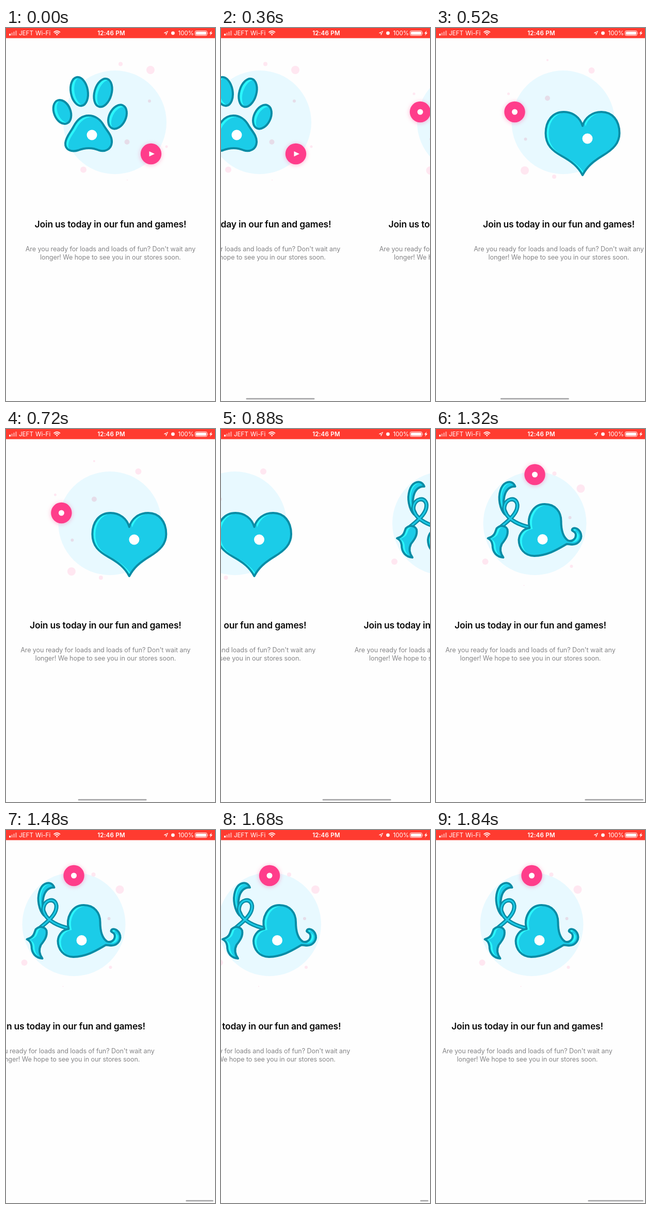
Write an HTML page that moves like this. It is 405 px wide and 720 px high and loops after 1.88 s.

```html
<!DOCTYPE html>
<html lang="en">
<head>
<meta charset="utf-8">
<title>Onboarding pages</title>
<style>
  html, body { margin: 0; width: 100%; height: 100%; overflow: hidden; background: #fefefe; }
  svg { display: block; width: 405px; height: 720px; }
  text { font-family: Inter, Roboto, "Liberation Sans", sans-serif; }
  .title { font-size: 17.5px; font-weight: 600; letter-spacing: -.2px; fill: #0a0a0a; text-anchor: middle; }
  .body { font-size: 12.6px; letter-spacing: -.09px; fill: #858587; text-anchor: middle; }
  .status { font-size: 11.6px; fill: #fff; }
  .clock { font-weight: 600; letter-spacing: .2px; text-anchor: middle; }
  .button { filter: drop-shadow(0 1px 4px rgba(255, 61, 139, .4)); }
  .edge { fill: none; stroke: #0a8ca5; stroke-width: 4; stroke-linejoin: round; }
</style>
</head>
<body>
<svg viewBox="0 0 405 720">
  <rect width="405" height="720" fill="#fefefe"/>
  <g id="pages"></g>
  <rect id="bar" y="714.5" height="2.6" rx="1.3" fill="#a2a2a4"/>
  <g id="status">
    <rect width="405" height="19.6" fill="#ff3b30"/>
    <g fill="#fff">
      <rect x="6" y="11" width="3" height="3.5" rx=".6"/>
      <g opacity=".4">
        <rect x="10" y="9" width="3" height="5.5" rx=".6"/>
        <rect x="14" y="7" width="3" height="7.5" rx=".6"/>
        <rect x="18" y="5" width="3" height="9.5" rx=".6"/>
      </g>
      <path d="M96.8 12.3Q98.7 10.7 100.6 12.3L98.7 14.5Z"/>
      <circle cx="323.5" cy="9.8" r="3.4"/>
      <rect x="368" y="7" width="20" height="6" rx="1"/>
      <path d="M390.8 8.2q1.6 1.7 0 3.6zM398.8 5l-5 5.6h2.8l-1.4 4.2 5-5.8h-2.8z"/>
    </g>
    <g fill="none" stroke="#fff">
      <path stroke-width="1.6" d="M92.4 8.3Q98.7 2.8 105 8.3M94.6 10.6Q98.7 7 102.8 10.6"/>
      <path d="M306.5 9.6L313.6 6.2L310.2 13.4V9.6Z" stroke-linejoin="round"/>
      <rect x="366.5" y="5.5" width="23" height="9" rx="2.2"/>
    </g>
    <text class="status" x="25" y="14">JEFT</text>
    <text class="status" x="57" y="14">Wi-Fi</text>
    <text class="status clock" x="204" y="14">12:46 PM</text>
    <text class="status" x="333.5" y="14">100%</text>
  </g>
</svg>
<script>
const LOOP = 1880, STEP = 40, PAGE = 405, LAST = 2 * PAGE;

let clips = 0;

// Filled outline with a light rim on the side opposite to the shift.
function blob(path, dx = 6, dy = 2) {
  const id = "clip" + clips++;
  return `<clipPath id="${id}"><path d="${path}"/></clipPath>
    <g clip-path="url(#${id})"><path d="${path}" fill="#2bf6fb"/>
    <path d="${path}" fill="#1bcce8" transform="translate(${dx} ${dy})"/></g>
    <path class="edge" d="${path}"/>`;
}

function toe(x, y, rx, ry, turn) {
  const oval = `M0 ${-ry}A${rx} ${ry} 0 0 1 0 ${ry}A${rx} ${ry} 0 0 1 0 ${-ry}Z`;
  return `<g transform="translate(${x} ${y}) rotate(${turn})">${blob(oval, 7, 1)}</g>`;
}

function disc(x, y, r, fill) {
  return `<circle cx="${x}" cy="${y}" r="${r}" fill="${fill}"/>`;
}

function dots(list) {
  return list.map(([x, y, r]) => {
    const inside = Math.hypot(x - 211, y - 182) < 100;
    return disc(x, y, r, inside ? "#e6dde9" : "#ffe7f1");
  }).join("");
}

function button(x, y, icon) {
  return `<g transform="translate(${x} ${y})"><circle class="button" r="20.2" fill="#ff3d8b"/>${icon}</g>`;
}

const badge = disc(0, 0, 5.5, "#fff");
const play = `<path d="M-3.5 -5L7 0L-3.5 5Z" fill="#fff"/>`;
const emblem = (x, y) => disc(x, y, 10, "#fff");

const paw = toe(109, 162, 16, 24, -22) + toe(142, 122.5, 16.5, 28, -10) +
  toe(188, 125, 16.5, 28, 16) + toe(216, 171.5, 16, 24.5, 26) +
  blob("M160 169C172 169 183 176 190 189C196 199 206 208 205 221C204 234 192 240 180 236C166 230 153 231 140 236C128 240 114 236 115 222C116 210 126 200 131 190C138 177 148 169 160 169Z", 6, 3) +
  emblem(166.5, 206.5);

const heart = blob("M248.5 189C244 173 230 162 212 162C190 162 177 180 177 203C177 226 190 237 208 247C228 258 240 268 248.5 284C257 268 268 258 288 246C308 234 320 222 320 203C320 178 306 162 285 162C267 162 253 173 248.5 189Z", 6, 1) +
  emblem(258, 213.5);

const vine = "M157 192C168 182 186 170 191 155C195 142 188 134 179 136C168 139 164 152 169 161C175 175 196 186 218 190";
const sprout = `<g transform="translate(-15 0)">
  ${blob("M188 111C184 101 176 101 170 104C160 109 155 126 158 143C160 153 163 160 168 165L172 162C166 152 164 142 167 130C170 117 178 110 188 111Z", 4, 2)}
  <g fill="none"><path d="${vine}" stroke="#0a8ca5" stroke-width="8"/>
  <path d="${vine}" stroke="#1bcce8" stroke-width="3"/></g>
  ${blob("M152 192C160 184 170 187 173 194C175 206 168 214 162 222C157 232 160 241 165 248C152 247 144 238 144 224C143 217 140 213 135 211C142 209 147 206 149 200Z", 6, 1)}
  ${blob("M216 191C210 170 222 145 245 145C266 145 277 160 277 178C277 195 280 208 290 215C300 219 307 210 305 202C303 197 299 198 298 195C299 189 309 190 314 199C320 211 311 223 299 223C295 223 292 222 288 222C272 231 253 244 225 245C206 245 195 230 195 214C196 201 205 192 216 191Z", 6, 2)}
  </g>` + emblem(226, 213);

const arts = [
  dots([[222, 69.5, 4], [280, 81, 8], [278, 141, 3], [234.5, 220, 5], [150, 273.5, 6], [311, 229, 2.5], [235, 293.5, 1]]) +
    paw + button(281, 243, play),
  dots([[266, 82, 6], [180.5, 135.5, 5], [105, 127, 2.5], [138, 214.5, 3], [136.5, 275, 8], [193.5, 287, 4], [180.5, 62, 2]]) +
    heart + button(117, 162, badge),
  dots([[249, 86, 4], [300, 115, 8], [279, 171, 3], [115, 256, 6], [282, 265, 3], [190, 302, 1]]) +
    sprout + button(211, 88, badge)
];

const pages = document.getElementById("pages");
const bar = document.getElementById("bar");

pages.innerHTML = arts.map((art, i) => `<g transform="translate(${i * PAGE} 0)">
  ${disc(211, 182, 100, "#e8f9ff")}${art}
  <text class="title" x="202.5" y="385">Join us today in our fun and games!</text>
  <text class="body" x="202.5" y="431.3">Are you ready for loads and loads of fun? Don't wait any</text>
  <text class="body" x="202.5" y="446.6">longer! We hope to see you in our stores soon.</text>
</g>`).join("");

// Scroll offset over time: two swipes, then a pull past the end that springs back.
const path = [
  [0, 0], [40, 1], [120, 8], [200, 28], [280, 70], [360, 136], [440, 272], [520, 369.5],
  [600, 398], [680, 406], [760, 432], [820, 497], [880, 589], [960, 705], [1040, 768],
  [1120, 795], [1200, 806], [1280, 817], [1380, 852], [1480, 889.5], [1600, 916],
  [1680, 927], [1760, 872], [1840, 835.5]
];

function slope(i) {
  const a = path[Math.max(i - 1, 0)], b = path[Math.min(i + 1, path.length - 1)];
  return (b[1] - a[1]) / (b[0] - a[0]);
}

function offsetAt(t) {
  let i = 0;
  while (i < path.length - 2 && path[i + 1][0] <= t) i++;
  const [t0, x0] = path[i], [t1, x1] = path[i + 1];
  const d = t1 - t0, u = (t - t0) / d, v = 1 - u;
  return x0 * v * v * (1 + 2 * u) + x1 * u * u * (3 - 2 * u) +
    d * u * v * (slope(i) * v - slope(i + 1) * u);
}

function draw(t) {
  const x = offsetAt(t);
  const over = Math.max(0, x - LAST);
  pages.setAttribute("transform", `translate(${-x} 0)`);
  bar.setAttribute("x", 4 + Math.min(x, LAST) * .327 + over);
  bar.setAttribute("width", 133 - over);
  bar.setAttribute("opacity", Math.min(1, t / 160));
}

const start = performance.now();
function tick() {
  const t = (performance.now() - start) % LOOP;
  draw(Math.floor(t / STEP) * STEP);
  requestAnimationFrame(tick);
}
tick();
</script>
</body>
</html>
```
